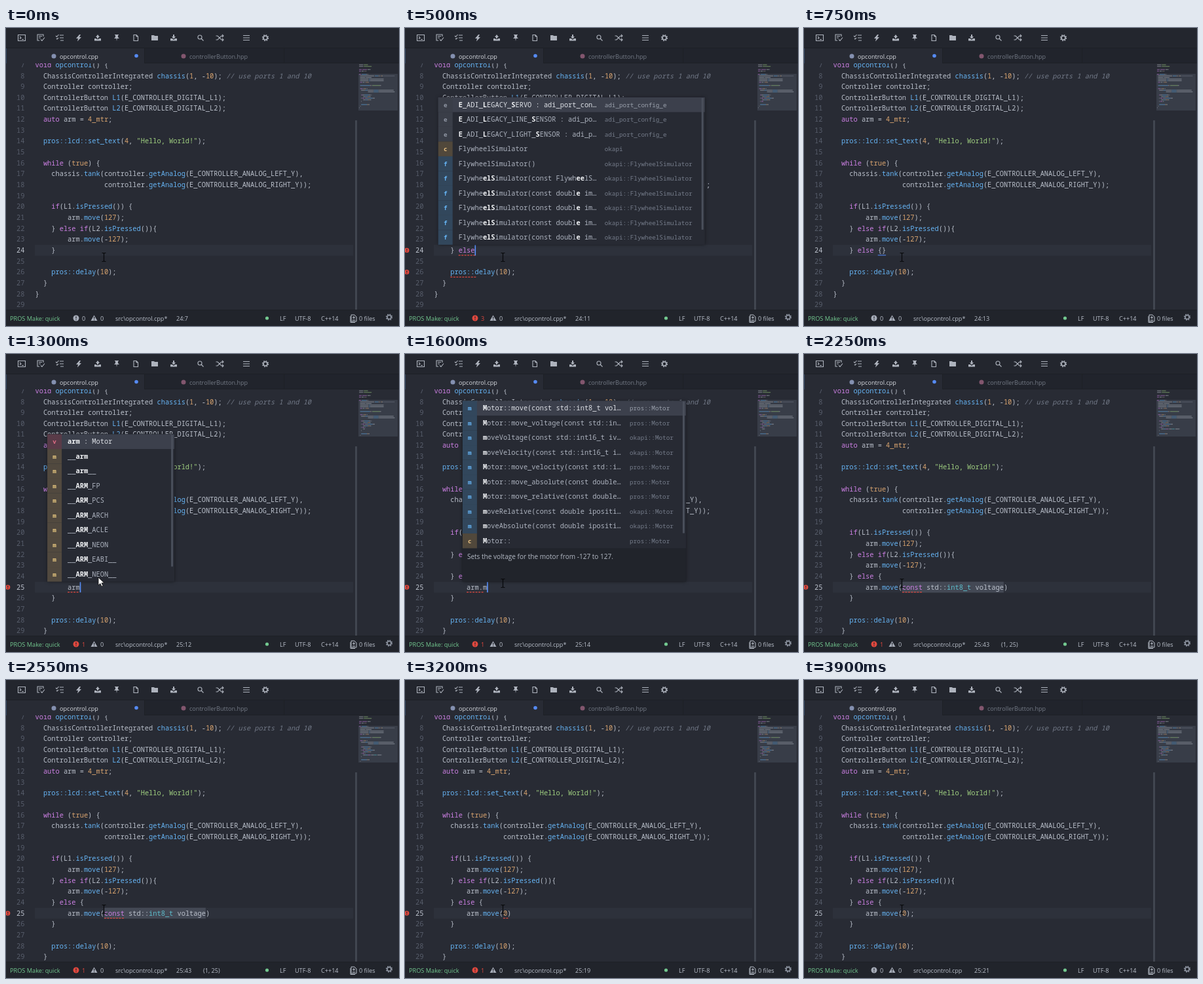
Animation of 600 by 455 pixels, one loop 3.95 s. Source, as an HTML page with a canvas:

```html
<!DOCTYPE html>
<html lang="en">
<head>
<meta charset="utf-8">
<title>Code editor</title>
<style>
html, body { margin: 0; width: 100%; height: 100%; overflow: hidden; background: #282b34; }
canvas { display: block; }
</style>
</head>
<body>
<canvas id="stage" width="600" height="455"></canvas>
<script>
const ctx = document.getElementById('stage').getContext('2d');
const LOOP = 3950, CHAR = 6.2, LEFT = 44.5, ROW = 16.65, MENU_ROW = 22.5;
const MONO = '"Noto Sans Mono", "DejaVu Sans Mono", monospace';
const CODE = `10.333px ${MONO}`, BOLD = `bold ${CODE}`, SMALL = `9.3px ${MONO}`;
const UI = '9.1px "Open Sans", "Noto Sans", sans-serif';
const INK = '#bac0cb', RED = '#e0483e', BLUE = '#66b4f4', EDGE = '#1d2026';

const head = ['#include "main.h"', '#include "okapi/api.hpp"', '', 'using namespace okapi;', 'auto port = 1;', '',
  'void opcontrol() {',
  '  ChassisControllerIntegrated chassis(1, -10); // use ports 1 and 10',
  '  Controller controller;',
  '  ControllerButton L1(E_CONTROLLER_DIGITAL_L1);',
  '  ControllerButton L2(E_CONTROLLER_DIGITAL_L2);',
  '  auto arm = 4_mtr;',
  '',
  '  pros::lcd::set_text(4, "Hello, World!");',
  '',
  '  while (true) {',
  '    chassis.tank(controller.getAnalog(E_CONTROLLER_ANALOG_LEFT_Y),',
  '                 controller.getAnalog(E_CONTROLLER_ANALOG_RIGHT_Y));',
  '',
  '    if(L1.isPressed()) {',
  '        arm.move(127);',
  '    } else if(L2.isPressed()){',
  '        arm.move(-127);'];
const tail = ['', '    pros::delay(10);', '  }', '}', ''];

// kind, label, origin
const menus = [
  { col: 6, width: 407, origin: 254, match: () => /^E|L(?=EG)|S(?=E)|e(?= im|elS…|lS…)|elS(?=imulator\(c)/g, items: [
    ['e', 'E_ADI_LEGACY_SERVO : adi_port_con…', 'adi_port_config_e'],
    ['e', 'E_ADI_LEGACY_LINE_SENSOR : adi_po…', 'adi_port_config_e'],
    ['e', 'E_ADI_LEGACY_LIGHT_SENSOR : adi_p…', 'adi_port_config_e'],
    ['c', 'FlywheelSimulator', 'okapi'],
    ['f', 'FlywheelSimulator()', 'okapi::FlywheelSimulator'],
    ['f', 'FlywheelSimulator(const FlywheelS…', 'okapi::FlywheelSimulator'],
    ...Array(4).fill(['f', 'FlywheelSimulator(const double im…', 'okapi::FlywheelSimulator'])] },
  { col: 8, width: 194, match: word => RegExp(word, 'gi'), items: [['v', 'arm : Motor', ''],
    ...['__arm', '__arm__', '__ARM_FP', '__ARM_PCS', '__ARM_ARCH', '__ARM_ACLE', '__ARM_NEON', '__ARM_EABI__', '__ARM_NEON__']
      .map(s => ['y', s, ''])] },
  { col: 12, width: 341, origin: 255, note: 'Sets the voltage for the motor from -127 to 127.',
    match: word => RegExp(word.length > 1 ? `(?<=^Motor::)${word}|^${word}` : '^m', 'gi'), items: [
    ['m', 'Motor::move(const std::int8_t vol…', 'pros::Motor'],
    ['m', 'Motor::move_voltage(const std::in…', 'pros::Motor'],
    ['m', 'moveVoltage(const std::int16_t iv…', 'okapi::Motor'],
    ['m', 'moveVelocity(const std::int16_t i…', 'okapi::Motor'],
    ['m', 'Motor::move_velocity(const std::i…', 'pros::Motor'],
    ['m', 'Motor::move_absolute(const double…', 'pros::Motor'],
    ['m', 'Motor::move_relative(const double…', 'pros::Motor'],
    ['m', 'moveRelative(const double ipositi…', 'okapi::Motor'],
    ['m', 'moveAbsolute(const double ipositi…', 'okapi::Motor'],
    ['c', 'Motor::', 'pros::Motor']] }
];
const kinds = { e: ['#3a3e48', '#9097a4'], c: ['#51483b', '#eac283'], f: ['#32475c', BLUE],
  m: ['#32475c', BLUE], y: ['#51493f', '#e8c780'], v: ['#593b48', '#e06c85'] };

// Each step changes some of the editor state; errors are [row, from column, to column].
const arm = '        arm', open = '    } else';
const steps = [
  [0, { row: 24, text: '    } ', col: 6, errors: [], count: 0, dirty: true }],
  [100, { text: '    } e', col: 7, caret: true }],
  [200, { text: '    } el', col: 8, menu: menus[0] }],
  [300, { text: '    } els', col: 9 }],
  [400, { text: open, col: 10, errors: [[24, 6, 10], [26, 4, 10]], count: 3 }],
  [550, { errors: [], count: 0 }],
  [600, { text: open + ' ', col: 11, menu: null }],
  [650, { text: open + ' {}', col: 12, caret: false, braces: true }],
  [900, { row: 25, text: '        ', col: 8, caret: true, braces: false }],
  [1050, { text: '        a', col: 9, menu: menus[1] }],
  [1150, { text: '        ar', col: 10 }],
  [1250, { text: arm, col: 11, errors: [[25, 8, 11]], count: 1 }],
  [1450, { text: arm + '.', col: 12, menu: menus[2] }],
  [1600, { text: arm + '.m', col: 13, errors: [[25, 8, 12]] }],
  [1850, { text: arm + '.mo', col: 14 }],
  [1950, { text: arm + '.mov', col: 15 }],
  [2050, { text: arm + '.move', col: 16 }],
  [2250, { text: arm + '.move(const std::int8_t voltage)', col: 42, menu: null, caret: false, selected: true, errors: [[25, 17, 22]] }],
  [2850, { text: arm + '.move(0)', selected: false, errors: [[25, 17, 18]], range: true }],
  [3100, { col: 18, range: false }],
  [3250, { col: 19 }],
  [3400, { text: arm + '.move(0);', col: 20 }],
  [3650, { dirty: false }],
  [3800, { errors: [], count: 0 }]
];

const icons = [
  [24, 'M-5.500-4.500H5.500V4.500H-5.500ZM-3-2l2 2l-2 2M0 2.500h3'],
  [53, 'M4-2V-5H-5V4H-2M-3-2.500H2M-3 0H0M0 2.500l2 2l4-5'],
  [82, 'M-6-3l1.500 1.500l3-3.500M0-4H6M-5 1l1 1l2-2M0 0H6M1 4H6'],
  [111, 'M1-5L-4 1H-1L-2 5.500L4-1H1L3-5Z', 1],
  [140, 'M-5 1H-2V2H2V1H5V4.500H-5ZM-1 1V-1H-3L0-5L3-1H1V1Z', 1],
  [169, 'M-3-5H3V-4H2V-1L4 1H.6L0 5L-.6 1H-4L-2-1V-4H-3Z', 1],
  [198, 'M-3-4.500H1L3.500-2V4.500H-3ZM1-4.500V-2H3.500'],
  [227, 'M-5-4H-1L0-3H5V4H-5Z', 1],
  [256, 'M-5 1H-2L0 3L2 1H5V4.500H-5ZM-1-5H1V-2H3L0 1.500L-3-2H-1Z', 1],
  [297, 'M2-1a3 3 0 1 1-6 0a3 3 0 1 1 6 0M1.500 1.500L4.500 4.500'],
  [326, 'M-5.500-3H-3L3 3H5.500M-5.500 3H-3L3-3H5.500M4-5L6-3L4-1M4 1L6 3L4 5'],
  [367, 'M-5-3.500H5M-5 0H5M-5 3.500H5']
].map(([x, d, solid]) => [x, new Path2D(d), solid]);

function box(x, y, w, h, color) {
  ctx.fillStyle = color;
  ctx.fillRect(x, y, w, h);
}
function print(text, x, y, color, font = UI, align = 'left') {
  ctx.font = font;
  ctx.textAlign = align;
  ctx.fillStyle = color;
  ctx.fillText(text, x, y + 3.5);
}
function dot(x, y, r, color) {
  ctx.fillStyle = color;
  ctx.beginPath();
  ctx.arc(x, y, r, 0, 7);
  ctx.fill();
}
function icon(x, y, path, solid, color = '#aeb3bd', width = 1.1) {
  ctx.save();
  ctx.translate(x, y);
  ctx.fillStyle = ctx.strokeStyle = color;
  ctx.lineWidth = width;
  solid ? ctx.fill(path) : ctx.stroke(path);
  ctx.restore();
}
function gear(x, y, color) {
  ctx.strokeStyle = color;
  for (const [r, width, dash] of [[3, 1.6, []], [4.4, 1.5, [1.73, 1.73]]]) {
    ctx.lineWidth = width;
    ctx.setLineDash(dash);
    ctx.beginPath();
    ctx.arc(x, y, r, 0, 2 * Math.PI);
    ctx.stroke();
  }
  ctx.setLineDash([]);
}
function alertMark(x, y, r, color) {
  dot(x, y, r, color);
  box(x - 0.6, y - r * 0.6, 1.2, r * 0.7, '#23262e');
  box(x - 0.6, y + r * 0.35, 1.2, 1.2, '#23262e');
}

const lineY = n => 73 + (n - 8) * ROW;
const colX = c => LEFT + c * CHAR;
const syntax = /(\/\/.*)|("[^"]*")|\b(void|auto|while|if|else|const|using|namespace)\b|\b(\d\w*|true)\b|((?:\w+::)*\w+(?=\())|\b(int8_t)\b|[^\s\w]+|\w+/g;
const palette = ['#727987', '#a0d080', '#cb7fe2', '#d9a46f', BLUE, '#5cbccb'];
function tokens(line) {
  return [...line.matchAll(syntax)].map(m => {
    const group = m.slice(1).findIndex(Boolean);
    return { col: m.index, text: m[0], color: palette[group] || INK, italic: group === 0 };
  });
}

function drawCode(s, lines) {
  const y = lineY(s.row);
  box(44, y - 8.3, 486, ROW, '#2d313b');
  if (s.selected) box(colX(17), y - 8.3, 25 * CHAR, ROW, '#434854');
  for (let n = 7; n <= 29; n++) {
    print(n, 28.5, lineY(n), n === s.row ? '#bcc2cd' : '#575d6b', CODE, 'right');
    for (const t of tokens(lines[n - 1] || ''))
      print(t.text, colX(t.col), lineY(n), t.color, (t.italic ? 'italic ' : '') + CODE);
  }
  if (s.braces) box(colX(11), y + 7, 2 * CHAR, 1, '#528bff');
  for (const [row, from, to] of s.errors) {
    for (let x = colX(from); x < colX(to) - 1; x += 4.5) box(x, lineY(row) + 7, 3, 1.2, RED);
    alertMark(2.8, lineY(row), 3.6, RED);
  }
  if (s.caret) box(colX(s.col), y - 8, 1.6, 16, '#5b93ff');
  box(533, 141, 3, 289, '#414650');
}

function drawMinimap(lines) {
  ctx.save();
  ctx.beginPath();
  ctx.rect(538, 54, 60, 72);
  ctx.clip();
  box(538, 70, 60, 56, '#383d48');
  ctx.globalAlpha = 0.45;
  lines.forEach((line, i) => {
    for (const t of tokens(line)) box(539 + t.col * 0.8, 55.5 + i * 2.43, t.text.length * 0.8, 1.3, t.color);
  });
  ctx.restore();
}

function drawMenu(s) {
  const { col, width, origin, note, match, items } = s.menu;
  const x = colX(col) - 31, height = MENU_ROW * items.length;
  const top = lineY(s.row) - 8.5 - height - (note ? 51 : 0);
  ctx.save();
  ctx.shadowColor = '#0008';
  ctx.shadowBlur = 5;
  box(x, top, width, height + (note ? 51 : 0), '#21242b');
  ctx.restore();
  box(x, top, width, height, '#272a33');
  const word = s.text.slice(col);
  items.forEach(([kind, label, from], i) => {
    const y = top + i * MENU_ROW, mid = y + MENU_ROW / 2, [back, fore] = kinds[kind];
    if (!i) box(x, y, width, MENU_ROW, '#3c404c');
    box(x, y, 22, MENU_ROW, back);
    print(kind === 'y' ? 'm' : kind, x + 11, mid, fore, 'bold ' + SMALL, 'center');
    const bold = new Set();
    for (const m of label.matchAll(match(word)))
      for (let k = 0; k < m[0].length; k++) bold.add(m.index + k);
    [...label].forEach((ch, k) => {
      const hit = bold.has(k);
      print(ch, x + 31 + k * CHAR, mid, hit ? '#f2f4f7' : i ? '#adb3bf' : '#dde0e6', hit ? BOLD : CODE);
    });
    if (from) print(from, x + origin, mid, i ? '#757c8a' : '#9a a0ac'.replace(' ', ''), SMALL);
  });
  box(x + width - 5, top + 1, 3, height - 24, '#4a4f5b');
  if (note) print(note, x + 7, top + height + 13, '#b3b9c4', UI.replace('9.1', '10.05'));
}

function drawChrome(s) {
  box(0, 0, 600, 30, '#23262e');
  for (const [x, path, solid] of icons) icon(x, 15, path, solid);
  gear(396, 15, '#aeb3bd');
  box(0, 30, 600, 24, '#21242c');
  box(0, 30, 600, 1, EDGE);
  box(0, 31, 211, 23, '#282b34');
  box(0, 31, 1, 23, '#30435f');
  box(211, 31, 1, 23, EDGE);
  box(424, 31, 1, 23, EDGE);
  box(211, 53, 389, 1, EDGE);
  dot(73, 43, 3.5, '#8490b0');
  dot(271, 43, 3.5, '#82566e');
  print('opcontrol.cpp', 82, 43, '#d7dae0');
  print('controllerButton.hpp', 280, 43, '#747a86');
  if (s.dirty) dot(199, 42.5, 2.8, '#568af2');
}

const triangle = new Path2D('M0-4.5L5 4H-5Z');
const files = new Path2D('M-4-5H1L4-2V5H-4ZM0-3V1M-2-1H2M-2 3H2M-5-3V6.500H2');
function drawStatus(s) {
  const y = 443;
  box(0, 430, 600, 25, '#21242b');
  box(0, 430, 600, 1, EDGE);
  print('PROS Make: quick', 6, y, '#73c990', UI.replace('9.1', '9.2'));
  alertMark(107, y, 4.5, s.count ? RED : '#a6acb8');
  print(s.count, 116, y, s.count ? RED : INK);
  icon(134.5, y, triangle, 1, '#a6acb8');
  box(134, y - 2, 1.2, 3, '#21242b');
  box(134, y + 2, 1.2, 1.2, '#21242b');
  print('0', 144, y, INK);
  print('src\\opcontrol.cpp' + (s.dirty ? '*' : ''), 167, y, INK);
  print(`${s.row}:${s.col + 1}`, 260, y, INK);
  if (s.selected || s.range) print('(1, 25)', 301, y, INK);
  dot(398.5, y, 2.6, '#73c990');
  print('LF', 418, y, INK);
  print('UTF-8', 441, y, INK);
  print('C++14', 481, y, INK);
  icon(531, y, files, 0, INK, 1);
  print('0 files', 539, y, INK);
  gear(585, 441.5, '#9299a6');
}

const arrow = new Path2D('M0 0V12L3 9.500L5 14L7 13L5 8.700H9Z');
const beam = new Path2D('M-3-6.500H-1L0-5.500L1-6.500H3M0-5.500V5.500M-3 6.500H-1L0 5.500L1 6.500H3');
function drawPointer(s) {
  if (s.menu === menus[1]) {
    icon(141, 341, arrow, 1, '#fff');
    icon(141, 341, arrow, 0, '#111', 0.8);
  } else icon(149.5, 350, beam, 0, '#08090b', 1.2);
}

function draw(now) {
  const t = now % LOOP;
  const s = Object.assign({}, ...steps.filter(([at]) => at <= t).map(([, change]) => change));
  const body = s.row === 24 ? [s.text] : [open + ' {', s.text, '    }'];
  const lines = [...head, ...body, ...tail];
  box(0, 0, 600, 455, '#282b34');
  drawCode(s, lines);
  drawMinimap(lines);
  if (s.menu) drawMenu(s);
  drawChrome(s);
  drawStatus(s);
  drawPointer(s);
}

const start = performance.now();
function tick() {
  draw(performance.now() - start);
  requestAnimationFrame(tick);
}
tick();
</script>
</body>
</html>
```
